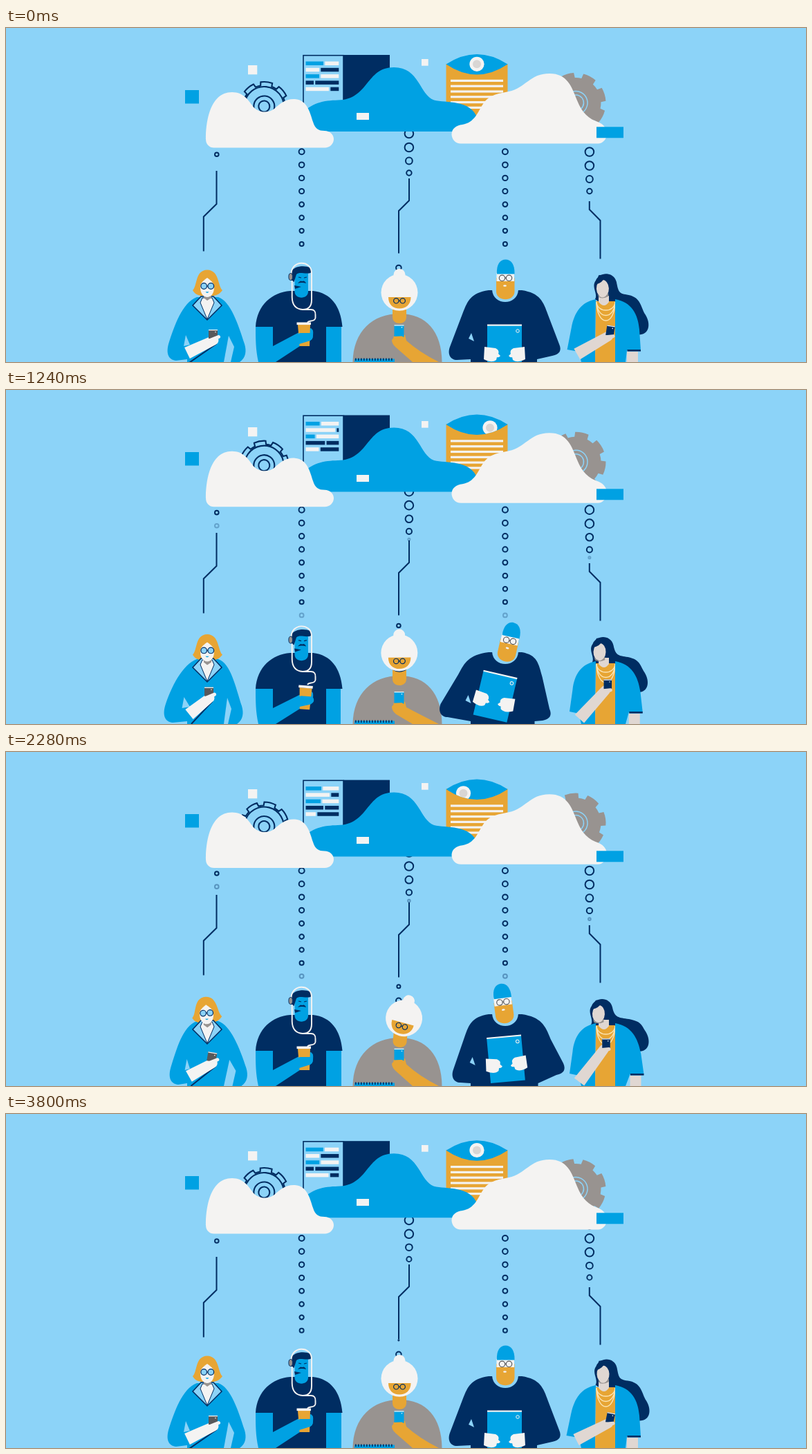
Animation of 1157 by 484 pixels, one loop 3840 ms. Source, as an HTML page with a canvas:

```html
<!DOCTYPE html>
<html lang="en">
<head>
<meta charset="utf-8">
<title>Cloud people</title>
<style>
html, body { margin: 0; width: 100%; height: 100%; overflow: hidden; background: #8cd3f8; }
canvas { display: block; }
</style>
</head>
<body>
<canvas id="stage" width="1157" height="484"></canvas>
<script>
const g = document.getElementById('stage').getContext('2d');
const LOOP = 3840, TAU = Math.PI * 2;
const SKY = '#8cd3f8', NAVY = '#002d62', BLUE = '#00a1e3', WHITE = '#f4f3f2',
      GOLD = '#e7a534', GRAY = '#989390', SKIN = '#e0d7d2', DARK = '#58595b';

// ---- drawing helpers
function paint(fill, stroke, w, path) {
  if (fill) { g.fillStyle = fill; path ? g.fill(path) : g.fill(); }
  if (stroke) {
    g.strokeStyle = stroke; g.lineWidth = w;
    path ? g.stroke(path) : g.stroke();
  }
}
function shape(d, fill, stroke, w = 2) { paint(fill, stroke, w, new Path2D(d)); }
function rect(x, y, w, h, c) { g.fillStyle = c; g.fillRect(x, y, w, h); }
function oval(x, y, rx, ry, fill, stroke, w = 2) {
  g.beginPath();
  g.ellipse(x, y, rx, ry, 0, 0, TAU);
  paint(fill, stroke, w);
}
function disc(x, y, r, fill, stroke, w) { oval(x, y, r, r, fill, stroke, w); }
function spin(px, py, rot, dx, dy, draw) {
  g.save();
  g.translate(px + dx, py + dy);
  g.rotate(rot);
  g.translate(-px, -py);
  draw();
  g.restore();
}
function shift(dx, dy, draw) { spin(0, 0, 0, dx, dy, draw); }
function limb(c, x1, y1, r1, x2, y2, r2) {
  const a = Math.atan2(y2 - y1, x2 - x1), s = Math.sin(a), k = Math.cos(a);
  g.beginPath();
  g.moveTo(x1 + s * r1, y1 - k * r1);
  g.arc(x2, y2, r2, a - Math.PI / 2, a + Math.PI / 2);
  g.lineTo(x1 - s * r1, y1 + k * r1);
  paint(c);
}

// ---- timing helpers
const mix = (a, b, f) => a + (b - a) * f;
const ease = f => f * f * (3 - 2 * f);

// steps: [time, pose name] pairs in loop order; poses: name -> values
function pose(t, steps, poses) {
  if (t < steps[0][0]) t += LOOP;
  let i = steps.length - 1;
  while (t < steps[i][0]) i--;
  const next = i + 1 < steps.length ? steps[i + 1] : [steps[0][0] + LOOP, steps[0][1]];
  const f = ease((t - steps[i][0]) / (next[0] - steps[i][0]));
  const b = poses[next[1]];
  return poses[steps[i][1]].map((v, k) => mix(v, b[k], f));
}
function ramp(u, list) {
  const i = Math.min(Math.floor(u), list.length - 2);
  return mix(list[i], list[i + 1], u - i);
}

// ---- sky
function gearPath(teeth, r, R, half) {
  g.beginPath();
  for (let i = 0; i < teeth; i++) {
    const a = i * TAU / teeth - Math.PI / 2;
    g.arc(0, 0, r, a - TAU / teeth + half + .03, a - half - .03);
    g.arc(0, 0, R, a - half, a + half);
  }
  g.closePath();
}
function gears(t, bob) {
  const turn = t / LOOP * Math.PI / 2;
  spin(0, 0, turn + .1, 373.3, 113.5 + bob - 3, () => {
    gearPath(8, 30.5, 35.5, .24);
    paint(SKY, NAVY, 2.1);
    disc(0, 0, 28.5, null, NAVY, 2.1);
    disc(0, 0, 15, null, NAVY, 2.1);
    disc(0, 0, 8, null, NAVY, 2.1);
  });
  spin(0, 0, turn + .49, 824, 108.5 + bob - 3, () => {
    gearPath(8, 36.5, 43.5, .23);
    paint(GRAY);
    disc(0, 0, 17, null, SKY, 1.5);
    disc(0, 0, 11.5, null, SKY, 1.5);
  });
}

const ROWS = [[BLUE, WHITE], [WHITE, NAVY], [BLUE, WHITE], [NAVY, NAVY], [WHITE, NAVY]];
const SPLITS = {
  a: [459, 453, 453, 445, 467], b: [439.5, 475, 445, 457, 452], c: [466, 477, 448, 465, 453],
  d: [456, 468, 455, 459, 448], e: [442, 456, 467, 450, 440]
};
function panel(t) {
  rect(430, 39.5, 58, 90, SKY);
  g.strokeStyle = NAVY; g.lineWidth = 1.6;
  g.strokeRect(430, 39.7, 58, 90);
  rect(488, 39, 67, 90, NAVY);
  const cut = pose(t, [[0, 'a'], [760, 'b'], [1680, 'c'], [2280, 'd'], [2700, 'e'], [3280, 'e']], SPLITS);
  ROWS.forEach(([left, right], i) => {
    const y = 48.5 + i * 9.3;
    rect(433.5, y, cut[i] - 433.5, 5.5, left);
    rect(cut[i] + 2.3, y, 481.3 - cut[i] - 2.3, 5.5, right);
  });
}
function envelope(t) {
  rect(636.5, 52, 89, 90, GOLD);
  for (let i = 0; i < 6; i++) rect(643, 74.8 + i * 7.8, 76, 3.2, WHITE);
  const lid = 'M636.5,52.5Q681,23.5 725.5,52.5Q681,82.5 636.5,52.5Z';
  shape(lid, BLUE);
  const [dx, dy] = pose(t, [[0, 'mid'], [700, 'mid'], [960, 'right'], [1250, 'right'], [1550, 'left'],
    [2350, 'left'], [2680, 'mid']], { mid: [0, 0], right: [19, 5], left: [-19.5, 6] });
  g.save();
  g.clip(new Path2D(lid));
  disc(681 + dx, 52.3 + dy, 10.6, WHITE);
  disc(681 + dx, 52.3 + dy, 6, '#d9d6d4');
  g.restore();
}
function ring(x, y, r, alpha) {
  g.globalAlpha = Math.max(0, Math.min(1, alpha));
  disc(x, y, Math.max(r, .4), null, NAVY, 2);
  g.globalAlpha = 1;
}
function dots(t) {
  const f = t / 960 % 1, gap = 19.1;
  for (const x of [427.6, 721.9])
    for (let k = 0; k < 9; k++) {
      const y = 179.2 + (k - f) * gap;
      ring(x, y, 4 - (y - 179) / 134, (332 - y) / gap);
    }
  for (let k = 0; k < 2; k++) ring(304.8, 183.2 + (k - f) * gap, 2.8, k ? f : 1);
  for (let k = 0; k < 5; k++) {
    const u = k + f, r = ramp(u, [.6, 3.7, 4.9, 6.3, 6.3, 6.3]);
    const y = ramp(u, [219, 210, 192.5, 173, 153, 133]);
    ring(582.9, y, r, u);
    ring(843.9, y + 26.5, r, u);
  }
  for (let k = 0; k < 2; k++) {
    const u = k + f;
    ring(567.9, 368 - u * 20.5, u < 1 ? 3.8 : 3.8 - 3.4 * f, 1);
  }
  for (const d of ['M304.5,207V255L285.8,273.5V323.5', 'M583,218V250L568,265V326.5', 'M843.8,251V263L859.5,279V334.5'])
    shape(d, null, NAVY, 2);
}
function sky(t) {
  const a = t / LOOP * TAU, side = 3 * Math.cos(a), mid = -2.8 * Math.sin(a);
  gears(t, side);
  shift(0, mid, () => { panel(t); envelope(t); });
  dots(t);
  shift(0, mid, () => shape('M428,150V126C440,108 460,105 480,104.5C525,104 520,57 561,57' +
    'C598,57 598,97 619,104.5C636,109 672,103 682,131L690,150Z', BLUE));
  shift(0, side - 3, () =>
    shape('M301,173.6C294,173.6 289,168.5 289,161C289,141 293,93 327,93C343,93 350,104 356,112' +
      'C362,122 378,125 388,117C397,109 405,102 418,103C436,104 440,124 444,136' +
      'C447,146 452,149 461,149C468,149 474,154 474,161C474,168 468,173.6 461,173.6Z', WHITE));
  shift(0, (side - 3) * .88, () =>
    shape('M658,167.6C650,167.6 644.5,161 644.5,154C644.5,146 651,141 660,140C678,137 682,122 690,110' +
      'C700,95 715,95 727,92C752,87 757,66 786,66C812,66 818,85 826,105C833,123 843,132 857,136.5' +
      'C865,140 869,146 869,153C869,161 863,167.6 856,167.6Z', WHITE));
  rect(259, 90, 20, 19.5, BLUE);
  rect(350, 54, 13.3, 13.3, WHITE);
  rect(601, 45, 9.7, 9.7, WHITE);
  rect(507, 123, 18, 10, WHITE);
  rect(854, 143.3, 39, 16, BLUE);
}

// ---- people
function glasses(x1, x2, y, r, c, fill) {
  disc(x1, y, r, fill, c, 1.2);
  disc(x2, y, r, fill, c, 1.2);
  shape(`M${x1 + r},${y}H${x2 - r}`, null, c, 1.2);
}
function phone(x, y, rot, w, h, c) {
  spin(x, y, rot, 0, 0, () => {
    rect(x - w / 2, y - h / 2, w, h, c);
    rect(x - w / 2, y - h / 2, w, 1.3, WHITE);
    disc(x + w / 2 - 3, y - h / 2 + 3.6, .8, WHITE);
  });
}

function bobWoman(t) {
  const [bl, br, hy, rot, ex, ey, px, py, pr] = pose(t,
    [[0, 'a'], [60, 'a'], [480, 'b'], [1220, 'b'], [1620, 'c'], [2040, 'c'], [2460, 'd'], [2850, 'd'], [3240, 'a']], {
      a: [0, 0, 0, 0, 259, 475, 299.5, 443.5, 0],
      b: [-5, -4, 3.5, 0, 262, 474, 293.5, 437, 0],
      c: [-3, -1.5, 0, 0, 259, 474, 296, 457, 0],
      d: [7, 5, 7, -.1, 263, 474, 299, 432, .28]
    });
  shape(`M276,390C255,398 ${244 + bl},430 ${235 + bl},458C${231 + bl},473 ${236 + bl},481 ${246 + bl},482` +
    `L262,480V484H${338 + br}C${347 + br},478 ${348 + br},468 ${345 + br},458C${336 + br},430 325,396 307,390Z`, BLUE);
  shape(`M${322 + br / 2},446L${330 + br},462L${325 + br},484H315Z`, SKY);
  shape(`M${260 + bl / 2},445L266,459L${257 + bl / 2},461Z`, SKY);
  shape(`M${ex + 6},${ey + 10}L${px + 5},${py + 14}`, null, NAVY, 2);
  limb(WHITE, ex + 3, ey - 4, 9, px + 1, py + 9, 7);
  phone(px, py, pr, 13, 13, DARK);
  limb(WHITE, px - 3, py + 9, 3, px + 8, py + 4, 2.5);
  spin(291, 392, rot, 0, hy, () =>
    shape('M270,380C277,374 273,351 291,350.5C309,351 306,374 313,380C309,386 303,388 299,388H284C279,388 273,386 270,380Z', GOLD));
  shape('M282,389L270,402L291,423L312,402L300,389Z', SKY, NAVY, 1.5);
  shape('M284,391L281,398L291,422L301,398L298,391Z', WHITE, NAVY, 1);
  spin(291, 392, rot, 0, hy, () => {
    shape('M286,382H297V391L291,395L286,391Z', GRAY);
    shape('M291,362C284,367 281,370 281,376C281,385 286,390 291,390C296,390 301,385 301,376C301,370 298,367 291,362Z', WHITE);
    glasses(286.2, 296.3, 374, 4.3, NAVY, SKY);
    shape('M288.5,382.3Q291,385.5 293.5,382.3Z', BLUE);
  });
}

function cupMan(t) {
  const [k] = pose(t, [[0, 'a'], [100, 'a'], [500, 'b'], [1800, 'b'], [2200, 'a']], { a: [0], b: [1] });
  const dy = k * 1.6;
  shape('M386,410H463V484H380Z', NAVY);
  rect(463, 432, 22 - k, 52, BLUE);
  shape('M361,433C363,401 385,383 411,381H444C470,384 484,403 486.5,433H463V455H386V433Z', NAVY);
  shape(`M361,433H386V461L418,${444 + k}L432,${437 + k}Q446,${430 + k} 444,${446 + k}` +
    `Q441,${456 + k} 428,${459 + k}L390,484H365C361,466 361,450 361,433Z`, BLUE);
  spin(431, 444, k * .08, k * 1.5, k * 1.7, () => {
    shape('M422,430H440L439,461H424.5Z', GOLD);
    rect(420.5, 426.5, 20.5, 3.6, WHITE);
    shape('M411,450L425,442H442Q447,449 440,453L424,458Z', BLUE);
  });
  shift(0, dy, () => {
    shape('M417.5,352H437V382C437,393.5 417.5,393.5 417.5,382Z', BLUE);
    shape('M413,366V353C416,345 432,343.5 440,347.5C444,351 442,356 437,355.5C430,356 424,353 420,357L416.5,368Z', NAVY);
    shape('M422,370Q426,365 428,367Q432,365 434,370Q428,368 422,370Z', NAVY);
    shape('M417,373L427,375L418,378Z', NAVY);
    shape('M423,361L427,362M431,362L435,361', null, NAVY, 1.2);
  });
  shape(`M412.5,${356 + dy}C413,${336 + dy} 441,${336 + dy} 442,${354 + dy}V394Q442,408 429,408` +
    `Q414,407 413.7,390V${366 + dy}M429,408H441Q448,408 447.5,416V420Q447,424 441,424.5Q437,425 436,427`, null, WHITE, 1.9);
  oval(411.7, 360.5 + dy, 2.8, 5, GRAY, NAVY, 1);
}

function bunWoman(t) {
  const [rot, hy, py] = pose(t,
    [[0, 'a'], [100, 'a'], [520, 'b'], [1200, 'b'], [1600, 'c'], [1850, 'c'], [2270, 'd'], [2850, 'd'], [3230, 'a']], {
      a: [0, 0, 439], b: [0, -2.5, 446], c: [-.24, 1, 439], d: [.27, 1.5, 438.5]
    });
  shape('M501.5,484C502,440 530,414 569,414C608,414 630,440 630.5,484Z', GRAY);
  rect(504, 479.5, 58, 5, BLUE);
  for (let x = 505; x < 561; x += 4) rect(x, 478.5, 1.6, 3.6, NAVY);
  spin(569, 425, rot * .35, 0, 0, () => {
    shape('M559,400H579V419C579,431 559,431 559,419Z', GOLD);
    shape('M559,404Q569,411 579,404', null, NAVY, 2.4);
  });
  spin(569, 408, rot, 0, hy, () => {
    disc(569, 357.5, 8.5, WHITE);
    disc(569, 383.3, 26.5, WHITE);
    shape('M553,390H585.5C585.5,401 578,406.5 569,406.5C560,406.5 553,401 553,390Z', GOLD);
    glasses(564.3, 573.7, 395.3, 3.7, NAVY);
  });
  shape(`M558,${py + 13}L564,${py + 6}H577L579,${py + 14}Q598,470 626,484H588L564,${py + 24}Q558,${py + 19} 558,${py + 13}Z`, GOLD);
  phone(568.5, py, 0, 14, 17.5, BLUE);
  limb(GOLD, 561, py + 12, 4, 572, py + 10, 2.5);
}

function beardMan(t) {
  const [bl, br, ly, ry, rot, tx, ty, tr, hand] = pose(t,
    [[0, 'a'], [100, 'a'], [560, 'b'], [1780, 'b'], [2240, 'd'], [2850, 'd'], [3240, 'a']], {
      a: [0, 0, 0, 0, 0, 721, 463, 0, 8],
      b: [-13.5, -14, -7, 4, .22, 707.5, 444, .23, 6],
      d: [5, 6, -2, -7, -.13, 723, 445, -.09, 6]
    });
  shape(`M698,380C${672 + bl / 4},384 ${668 + bl / 3},395 ${661 + bl / 2},412L${642 + bl},${462 + ly}` +
    `C${638 + bl},${473 + ly} ${643 + bl},${481 + ly} ${652 + bl},${481 + ly}L672,480V484H${768 + br / 4}` +
    `V480L${790 + br},${475 + ry}C${801 + br},${473 + ry} ${804 + br},${467 + ry} ${800 + br},${458 + ry}` +
    `L${784 + br * .6},416C${777 + br / 2},396 ${772 + br / 4},384 746,380Z`, NAVY);
  shape(`M${673 + bl / 3},442L${677 + bl / 3},454L${669 + bl / 3},450Z`, SKY);
  shape('M703,379C704,403 740,403 741,379Z', SKY);
  spin(721, 390, rot, 0, 0, () => {
    shape('M709,362H735.5V382C735,397 709.5,397 709,382Z', GOLD);
    rect(709.5, 355, 25.5, 12, WHITE);
    shape('M710,356.5C709,342 715,335.5 722.5,335.5C730,335.5 736,342 735.5,356.5Z', BLUE);
    glasses(717.5, 727.5, 362.3, 4.2, DARK);
    oval(721.5, 373.5, 2.4, 1.3, WHITE);
  });
  spin(0, 0, tr, tx, ty, () => {
    rect(-25, -33, 50, 66, BLUE);
    rect(-25, -33.5, 50, 2.2, WHITE);
    disc(19, -24, 2.3, null, WHITE, 1);
    for (const side of [-1, 1]) {
      g.save();
      g.scale(side, 1);
      shape(`M29,${hand - 9}L13,${hand - 7}Q7,${hand - 4} 9,${hand + 1}L6,${hand + 4}Q8,${hand + 7} 11,${hand + 6}` +
        `L12,${hand + 10}Q18,${hand + 15} 30,${hand + 9}Z`, WHITE);
      g.restore();
    }
  });
}

function longHairWoman(t) {
  const [hx, hy, tail, lift, turn, bl, br, ex, ey, px, py, pr] = pose(t,
    [[200, 'b'], [950, 'b'], [1450, 'c'], [2330, 'c'], [2720, 'd'], [3560, 'd']], {
      b: [-2, 1, -2, 1, 0, 3, 0, 830, 474, 874, 433.5, 0],
      c: [-6, 1, 2, -10, .05, 3, 4.5, 829, 478, 868, 422.5, 0],
      d: [3, -4, 8, 0, -.1, -6, 0, 819, 470, 874, 447, .4]
    });
  const x = v => v + hx, y = v => v + hy, a = v => v + tail, b = v => v + lift;
  shape(`M${x(852)},${y(394)}C${x(857)},${y(387)} ${x(846)},${y(376)} ${x(853)},${y(367)}` +
    `C${x(858)},${y(354)} ${x(879)},${y(353)} ${x(883)},${y(369)}C${x(886)},${y(384)} 886,385 ${a(899)},387` +
    `C${a(917)},391 ${a(916)},${b(404)} ${a(923)},${b(415)}C${a(931)},${b(428)} ${a(929)},${b(444)} ${a(913)},${b(444)}L885,415Z`, NAVY);
  shape('M853,396H882V484H852Z', GOLD);
  shape('M857,388H872V397Q865,407 857,397Z', SKIN);
  spin(863, 378, turn, hx, hy, () => {
    oval(863, 378.5, 9, 12.5, SKIN);
    shape('M855,386Q863,397 871,385L871,390Q863,394 857,391Z', GRAY);
    shape('M853,372Q863,371 867,361Q871,369 874,372L871,358L858,359Z', NAVY);
  });
  for (const low of [413, 423, 433]) shape(`M854,397C855,${low} 880,${low} 881,397`, null, '#fbe3b0', 1.5);
  shape(`M853,393C832,397 822,412 ${818 + bl / 2},434L${812 + bl},466L834,470L852,456Z`, BLUE);
  shape(`M881,393C905,397 914,415 ${916 + br / 2},437L${918 + br},467H${898 + br}L896,484H881Z`, BLUE);
  rect(898.5 + br, 466, 19.5, 2.6, NAVY);
  rect(898 + br, 469, 16, 15, SKIN);
  shape('M830,476L852,460V484H832Z', BLUE);
  limb(SKIN, ex, ey, 9, px - 3, py + 8, 7);
  phone(px, py, pr, 11.5, 14.5, NAVY);
  limb(SKIN, px - 6, py + 10, 3.5, px + 4, py + 8, 2.5);
}

function draw(now) {
  const t = now % LOOP;
  rect(0, 0, 1157, 484, SKY);
  sky(t);
  bobWoman(t);
  cupMan(t);
  bunWoman(t);
  beardMan(t);
  longHairWoman(t);
}
let start;
function tick(now) {
  if (start === undefined) start = now;
  draw(now - start);
  requestAnimationFrame(tick);
}
requestAnimationFrame(tick);
</script>
</body>
</html>
```
